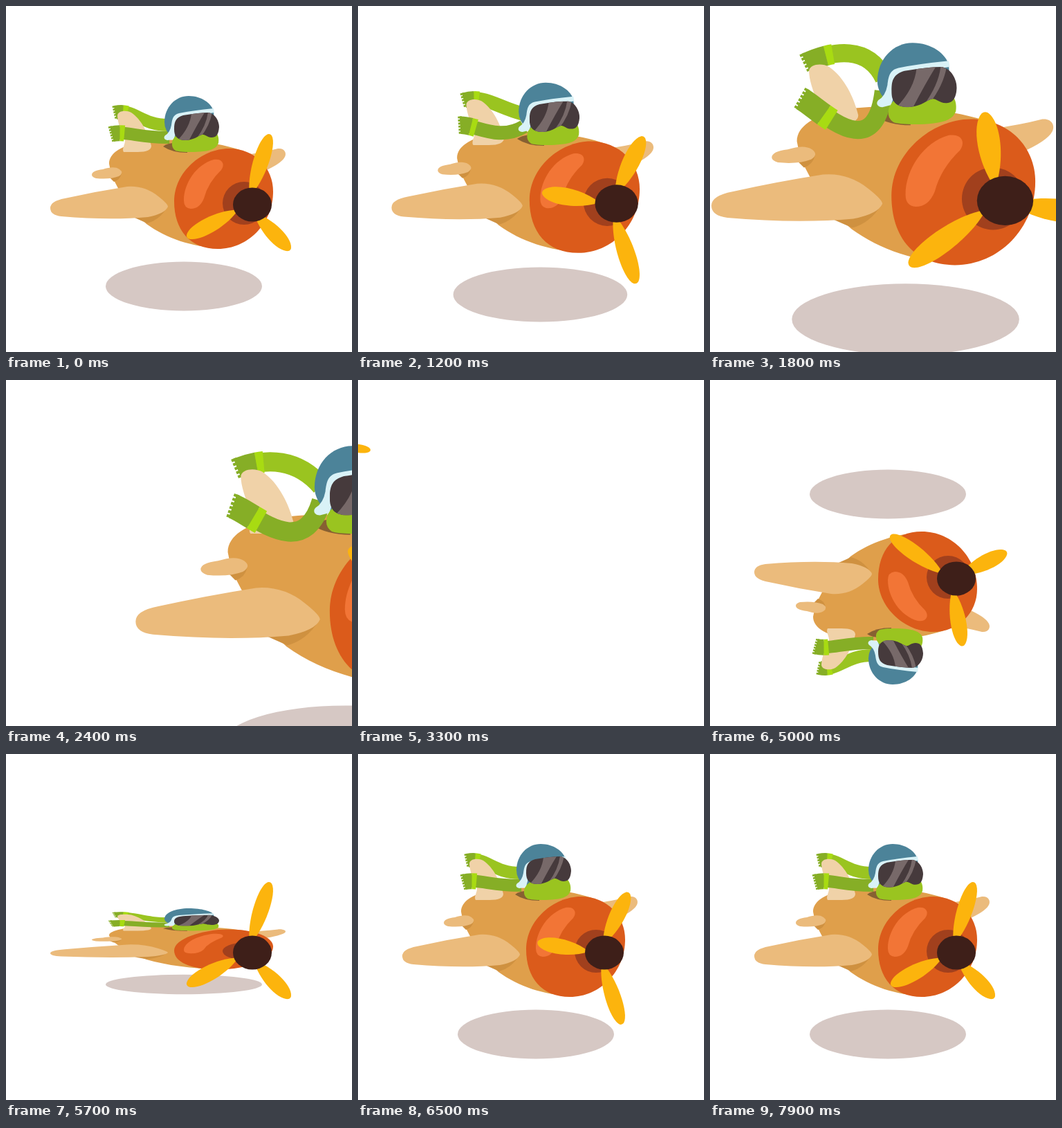
An HTML page for the animation above (8 s loop, 500x500 px).

```html
<!DOCTYPE html>
<html lang="en">
<head>
<meta charset="utf-8">
<title>Little plane</title>
<style>
html, body { margin: 0; height: 100%; overflow: hidden; background: #fff; }
svg { display: block; width: 100vw; height: 100vh; }
.scarf { fill: none; }
</style>
</head>
<body>
<svg viewBox="0 0 500 500">
  <clipPath id="lens"><path d="M243 178C243 166 246 161 256 158Q280 154 293 154C303 156 308 167 308 175C307 187 303 190 297 190C290 190 288 185 283 186C276 188 274 193 260 194C247 194 243 188 243 178Z"/></clipPath>
  <g id="plane">
    <g id="body">
      <ellipse cx="257" cy="405" rx="113" ry="35.5" fill="#d6c8c4"/>
      <path fill="#ebbb7c" d="M340 216Q370 212 393 206C402 205 406 212 403 218Q398 228 370 240Z"/>
      <path fill="#df9f4b" d="M149 228C149 212 168 203 185 199C220 188 320 193 360 218L310 350C268 348 232 336 203 315Q170 285 152 243Z"/>

      <g id="upper" class="scarf" stroke="#9ac420"></g>
      <path fill="#f0d2a8" d="M161 158C162 151 174 150 181 154C196 164 206 185 210 202Q210 211 190 211H170C167 207 172 200 172 195Q161 170 161 158Z"/>
      <path fill="#876032" d="M227 203Q235 196 262 198V212Q240 212 227 203Z"/>
      <g id="lower" class="scarf" stroke="#86ae26"></g>

      <path fill="#4c8399" d="M229 168C229 146 245 130 264 130C283 130 297 141 300 152L302 185L240 190Q229 180 229 168Z"/>
      <path fill="#9ac420" d="M240 198C241 186 255 180 275 179H300C307 184 308 192 307 198Q304 208 285 210C270 212 250 211 245 209Q239 205 240 198Z"/>
      <path fill="#d9f2f7" d="M300 148Q270 151 250 155C241 157 240 164 239 172Q237 183 230 187C227 190 229 194 234 194L242 192Q246 186 246 172Q247 162 258 160L301 154Z"/>
      <g id="goggles" clip-path="url(#lens)">
        <path fill="#463a3c" d="M240 150H310V196H240Z"/>
        <path fill="#776969" d="M268 155L287 154Q277 170 264 195H247Q266 176 268 155ZM292 153H298Q295 172 281 190L275 192Q290 172 292 153Z"/>
      </g>

      <path fill="#cf9140" d="M150 248L167 242Q165 251 156 254ZM186 306L233 291Q222 309 204 314Z"/>
      <path fill="#ebbb7c" d="M124 244Q124 238 140 236C150 233 158 232 164 236Q171 241 163 246Q150 251 130 249Q124 247 124 244ZM64 292Q64 282 85 278Q130 268 175 261Q200 259 220 275Q234 286 234 290Q230 300 205 305Q150 310 80 304Q64 302 64 292Z"/>

      <path fill="#db5b1b" d="M243 282C243 240 283 206 322 206C360 206 386 234 386 268C386 314 350 351 306 351C266 351 243 324 243 282Z"/>
      <path fill="#f27536" d="M257 281C257 256 275 229 300 222C313 220 317 229 311 237Q292 255 286 278Q280 293 267 293Q257 292 257 281Z"/>
      <ellipse cx="344" cy="285" rx="31" ry="31" fill="#a1401d"/>
    </g>
    <g id="blades" fill="#fcb40d"></g>
    <ellipse cx="356" cy="287" rx="28" ry="24.5" fill="#3e1f19"/>
  </g>
</svg>
<script>
const find = id => document.getElementById(id);
const move = (id, transform) => find(id).setAttribute('transform', transform);
const mix = (a, b, u) => a.map((v, i) => v + (b[i] - v) * u);

// One blade per [angle, length]
find('blades').innerHTML = [[-72, 107], [46, 89], [152, 97]].map(([angle, r]) =>
  `<path transform="rotate(${angle})" d="M14 0C40 -14 ${r - 10} -15 ${r} -3Q${r + 2} 0 ${r} 3C${r - 10} 15 40 14 14 0Z"/>`
).join('');

// A ribbon with a wide dark end, a bright stripe and a row of fringe teeth
function drawScarf(id, wave, hanging, billowing, width) {
  const [x, y, ...rest] = mix(hanging, billowing, wave);
  const curve = `M${x} ${y}C${rest}`;
  const end = 14 + 12 * wave;
  const tilt = Math.atan2(rest[1] - y, rest[0] - x) * 180 / Math.PI;
  const stroke = (color, w, dash) =>
    `<path d="${curve}" pathLength="100" stroke="${color}" stroke-width="${w}" stroke-dasharray="${dash}"/>`;
  find(id).innerHTML =
    `<path d="${curve}" stroke-width="18"/>` +
    stroke('#86ae26', width, `${end} 200`) +
    stroke('#a8db12', width, `0 ${end} 8 200`) +
    `<path d="M0 ${-width / 2}V${width / 2}" stroke="#86ae26" stroke-width="5" stroke-dasharray="2.6 1.4"
      transform="translate(${x} ${y}) rotate(${tilt})"/>`;
}

// Plane centre x, y and scale
const home = [250, 285, 1], near = [278, 276.8, 1.567];
const offRight = [780, 430, 1.567], offLeft = [-230, 10, 1 / 3];

function draw(step) {
  const time = step / 10, u = time % 1;
  const peak = at => Math.max(0, 1 - Math.abs(time - at));
  const [from, to] = [[home, home], [home, near], [near, offRight], [offLeft, home]][Math.floor(time)] || [home, home];
  const [x, y, size] = mix(from, to, u);
  const flip = 1 - 2 * peak(5);

  // The propeller pauses for one step at the start of each later scene
  const pauses = Math.max(0, Math.ceil(time - 4));
  const turn = time < 1 ? 0 : (step - pauses) * 72;

  move('plane', `translate(${x} ${y}) scale(${size}) translate(-250 -285)`);
  move('body', `translate(0 ${285 * (1 - flip)}) scale(1 ${flip})`);
  move('goggles', `translate(0 ${-12 * peak(7)})`);
  move('blades', `translate(348 288) rotate(${turn})`);
  drawScarf('upper', peak(2), [158, 154, 185, 148, 195, 172, 234, 172], [158, 149, 185, 135, 226, 122, 236, 164], 20);
  drawScarf('lower', peak(2), [153, 185, 172, 180, 195, 191, 236, 190], [154, 186, 172, 200, 234, 270, 235, 175], 23);
}

function tick() {
  draw(Math.floor(performance.now() / 100) % 80);
  requestAnimationFrame(tick);
}
tick();
</script>
</body>
</html>
```
